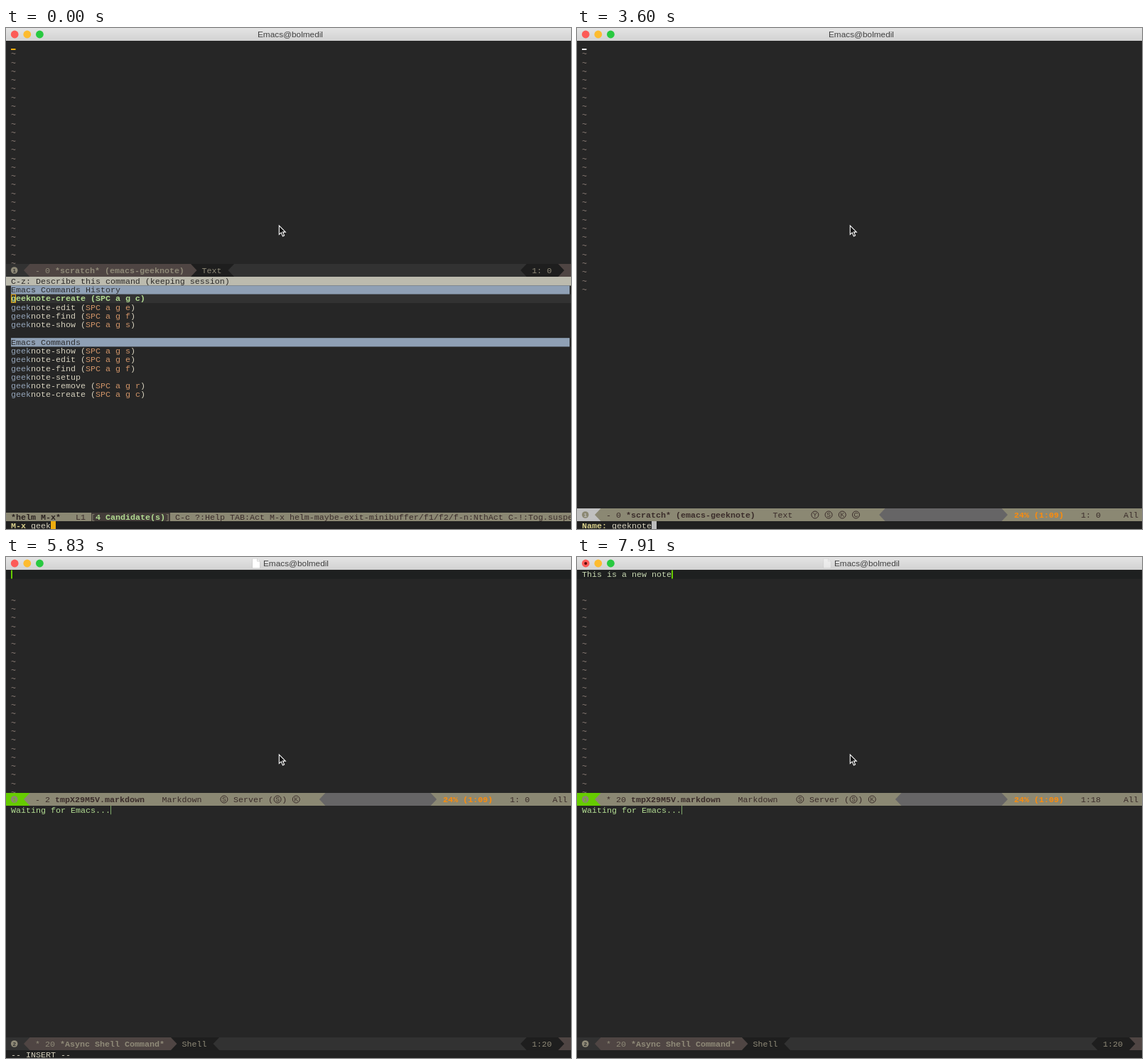
These frames come from a looping animation (795 by 705 pixels, 8000 ms). An HTML page with a canvas:

```html
<!DOCTYPE html>
<html lang="en">
<head>
<meta charset="utf-8">
<title>Editor session</title>
<style>
html, body { margin: 0; width: 100%; height: 100%; overflow: hidden; background: #262626; }
canvas { display: block; }
</style>
</head>
<body>
<canvas id="stage" width="795" height="705"></canvas>
<script>
const ctx = document.getElementById('stage').getContext('2d');
const W = 795, H = 705, LOOP = 8000;
const CHAR = 7, LINE = 12.28, LEFT = 7, BAR = 18;
const TOP = 18.4, SPLIT = 350.2, MINI = 694;
const MONO = '11.667px "Liberation Mono", monospace';
const C = {
  bg: '#262626', cream: '#d5d0bd', orange: '#d09468', blue: '#94a4b8', green: '#b2dc92',
  tan: '#8b8873', ink: '#3a2c2a', grey: '#666566', brown: '#4f4543', dim: '#8f8a78',
  panel: '#323232', black: '#1e1e1e', amber: '#eead0e', insert: '#66cc00', yellow: '#d9d08c'
};

// [start time, characters typed]
const NAME_KEYS = [[600, 0], [2700, 2], [3000, 4], [3300, 5], [3450, 7], [3600, 8]];
const NOTE_KEYS = [[0, 0], [6130, 1], [6280, 2], [6430, 4], [6580, 5], [6720, 7], [6870, 8],
  [7020, 9], [7170, 10], [7320, 12], [7470, 13], [7620, 15], [7770, 17], [7910, 18]];
const typed = (text, keys, t) => text.slice(0, keys.filter(k => k[0] <= t).pop()[1]);

function rect(x, y, w, h, color) {
  ctx.fillStyle = color;
  ctx.fillRect(x, y, w, h);
}

function disc(x, y, r, color) {
  ctx.fillStyle = color;
  ctx.beginPath();
  ctx.arc(x, y, r, 0, 7);
  ctx.fill();
}

function text(s, x, y, color, bold) {
  ctx.font = (bold ? 'bold ' : '') + MONO;
  ctx.fillStyle = color;
  ctx.fillText(s, x, y);
  return x + s.length * CHAR;
}

const row = (s, x, top, color, bold) => text(s, x, top + 9.6, color, bold);

function badge(s, x, y, font, color) {
  ctx.font = font;
  ctx.fillStyle = color;
  ctx.textAlign = 'center';
  ctx.fillText(s, x, y + 3);
  ctx.textAlign = 'left';
}

// Fills from x to the right edge, starting with an arrow-shaped side
function segment(x, y, color, pointsRight) {
  const [tip, corner] = pointsRight ? [x + 8.5, x] : [x, x + 8.5];
  ctx.fillStyle = color;
  ctx.beginPath();
  ctx.moveTo(corner, y);
  ctx.lineTo(W, y);
  ctx.lineTo(W, y + BAR);
  ctx.lineTo(corner, y + BAR);
  ctx.lineTo(tip, y + BAR / 2);
  ctx.fill();
}

function windowNumber(n, y, bg, fg) {
  rect(0, y, W, BAR, bg);
  disc(11.7, y + 9, 4.8, fg);
  badge(n, 11.7, y + 9, 'bold 8px "Liberation Sans", sans-serif', bg);
}

// Minor modes: capitals after "^" are drawn in circles
function minorModes(s, x, y) {
  for (let i = 0; i < s.length; i++) {
    if (s[i] !== '^') {
      x = text(s[i], x, y + 12.9, C.ink);
      continue;
    }
    ctx.strokeStyle = C.ink;
    ctx.lineWidth = 1;
    ctx.beginPath();
    ctx.arc(x + 6.1, y + 9, 5, 0, 7);
    ctx.stroke();
    badge(s[++i], x + 6.1, y + 9, '8.5px "Liberation Sans", sans-serif', C.ink);
    x += 12.2;
  }
  return x;
}

function activeBar(y, state, size, name, mode, minors, pos) {
  const base = y + 12.9;
  windowNumber('1', y, state, C.tan);
  segment(25, y, C.tan);
  let x = text(size + ' ', 41, base, C.ink);
  x = text(name, x, base, C.ink, true);
  x = text(mode, x + 24.5, base, C.ink);
  x = minorModes(minors, x + 25.3, y);
  segment(x + 26.5, y, C.grey);
  segment(597.5, y, C.tan, true);
  text('24% (1:09)', 615, base, '#ff8c0a', true);
  text(pos, 709, base, C.ink);
  text('All', 769, base, C.ink);
}

function idleBar(y, n, size, name, mode, pos) {
  const base = y + 12.9;
  windowNumber(n, y, C.panel, C.dim);
  segment(25, y, C.brown);
  let x = text(size + ' ', 41, base, C.dim);
  x = text(name, x, base, C.dim, true);
  segment(x + 9, y, C.black, true);
  x = text(mode, x + 24.5, base, C.dim);
  segment(x + 9, y, C.panel);
  segment(724, y, C.black);
  segment(777, y, C.brown, true);
  text(pos, 740, base, C.dim);
}

function titleBar(hasFile, modified) {
  const shade = ctx.createLinearGradient(0, 0, 0, 18);
  shade.addColorStop(0, '#e4e4e4');
  shade.addColorStop(1, '#d2d2d2');
  rect(0, 0, W, 18, shade);
  ['#fc5b57', '#fdbc2f', '#28c940'].forEach((c, i) => disc(12.2 + 17.6 * i, 9, 5.4, c));
  if (modified) disc(12.2, 9, 2, '#5c0a08');
  if (hasFile) {
    ctx.globalAlpha = modified ? 0.45 : 1;
    ctx.fillStyle = '#fff';
    ctx.strokeStyle = '#b8b8b8';
    ctx.lineWidth = 0.6;
    ctx.stroke(new Path2D('M347 2.5h6.5l3.5 3.5v9.5h-10z'));
    ctx.fill(new Path2D('M347 2.5h6.5l3.5 3.5v9.5h-10z'));
    ctx.stroke(new Path2D('M353.5 2.5v3.5h3.5'));
    ctx.globalAlpha = 1;
  }
  ctx.font = '11.8px "Liberation Sans", sans-serif';
  ctx.fillStyle = '#404040';
  ctx.fillText('Emacs@bolmedil', hasFile ? 362 : 354, 13);
}

function tildes(first, last) {
  for (let i = first; i <= last; i++) row('~', LEFT, TOP + i * LINE, '#8e7f78');
}

function pointer() {
  const arrow = new Path2D('M384.3 278v12.6l2.9-2.7 2.2 5 2.2-1-2.2-4.8h3.9z');
  ctx.fillStyle = '#111';
  ctx.strokeStyle = '#fff';
  ctx.lineWidth = 1.1;
  ctx.fill(arrow);
  ctx.stroke(arrow);
}

function candidate(name, key, i, selected) {
  const y = SPLIT + i * LINE;
  if (selected) {
    rect(LEFT, y, W, LINE, C.panel);
    row(`geeknote-${name} (SPC a g ${key})`, LEFT, y, C.green, true);
    ctx.strokeStyle = C.amber;
    ctx.lineWidth = 1;
    ctx.strokeRect(7.5, y + 0.5, 6, 11);
    return;
  }
  let x = row('geek', LEFT, y, C.blue);
  x = row('note-' + name, x, y, C.cream);
  if (!key) return;
  x = row(' (', x, y, C.cream);
  x = row('SPC a g ' + key, x, y, C.orange);
  row(')', x, y, C.cream);
}

function heading(s, i) {
  const y = SPLIT + i * LINE;
  rect(LEFT, y, 786, LINE, '#8fa0b5');
  row(s, LEFT, y, '#2e2e30');
}

function commandList() {
  rect(0, 350, W, 12.5, '#bcbbae');
  row('C-z: Describe this command (keeping session)', LEFT, SPLIT, '#2c2a28');
  heading('Emacs Commands History', 1);
  heading('Emacs Commands', 7);
  'create edit find show'.split(' ').forEach((n, i) => candidate(n, n[0], i + 2, !i));
  'show edit find setup remove create'.split(' ')
    .forEach((n, i) => candidate(n, n === 'setup' ? '' : n[0], i + 8));

  rect(0, 682, W, 12, C.tan);
  const y = 682.2;
  row('*helm M-x*', LEFT, y, '#2a2220', true);
  row('L1', 98, y, C.ink);
  rect(120, 682, 111, 12, '#433c39');
  row('[', 119, y, C.tan);
  row('4 Candidate(s)', 126, y, C.green, true);
  row(']', 224, y, C.tan);
  row('C-c ?:Help TAB:Act M-x helm-maybe-exit-minibuffer/f1/f2/f-n:NthAct C-!:Tog.suspend', 238, y, C.ink);
}

function prompt(label, input, cursor) {
  const x = row(input, row(label + ' ', LEFT, MINI, C.yellow, true), MINI, C.cream);
  rect(x, MINI, CHAR, 11, cursor);
}

function editor(t) {
  const note = typed('This is a new note', NOTE_KEYS, t), n = note.length;
  const inserting = t >= 5830;
  rect(0, 18.5, W, LINE, '#1e2020');
  const x = row(note, LEFT, TOP, '#c6d6b0');
  rect(x, 18.5, inserting ? 2 : CHAR, 12, inserting ? C.insert : C.amber);
  tildes(3, 25);
  activeBar(332, inserting ? C.insert : C.amber, `${n ? '*' : '-'} ${n + 2}`,
    'tmpX29M5V.markdown', 'Markdown', '^S Server (^S) ^K', '1:' + String(n).padStart(2));
  if (!inserting && t >= 5230) row('When done with a buffer, type C-x #', LEFT, MINI, C.cream);
  if (inserting && !n) row('-- INSERT --', LEFT, MINI, C.cream);
}

function shell(t) {
  const done = t >= 4200;
  const x = row(done ? 'Waiting for Emacs...' : '', LEFT, SPLIT, C.green);
  rect(x, 350, 1, 12.3, done ? '#7fa86a' : '#8a8a8a');
  idleBar(676, '2', done ? '* 20' : '- 0', '*Async Shell Command*', 'Shell', done ? '1:20' : '1: 0');
}

function scratchBar(y) {
  activeBar(y, '#c0c0c0', '- 0', '*scratch* (emacs-geeknote)', 'Text', '^Y ^S ^K ^C', '1: 0');
}

function draw(t) {
  const hasFile = t >= 5080;
  rect(0, 0, W, H, C.bg);
  rect(0, MINI, W, 11, '#202020');
  titleBar(hasFile, t >= 6130);
  if (hasFile) {
    editor(t);
  } else {
    const cursor = t < 600 ? C.amber : t < 3900 ? '#ececec' : t < 4200 ? C.insert : C.amber;
    rect(LEFT, 29, 6.5, 2, cursor);
    tildes(1, t >= 600 && t < 3900 ? 28 : 25);
  }
  if (t < 600) {
    idleBar(332, '1', '- 0', '*scratch* (emacs-geeknote)', 'Text', '1: 0');
    commandList();
    prompt('M-x', 'geek', C.amber);
  } else if (t < 3900) {
    scratchBar(676);
    prompt('Name:', typed('geeknote', NAME_KEYS, t), '#bdbdbd');
  } else {
    if (!hasFile) {
      scratchBar(332);
      row('Creating note: geeknote', LEFT, MINI, C.cream);
    }
    shell(t);
  }
  pointer();
}

const start = performance.now();
function tick() {
  draw((performance.now() - start) % LOOP);
  requestAnimationFrame(tick);
}
tick();
</script>
</body>
</html>
```
